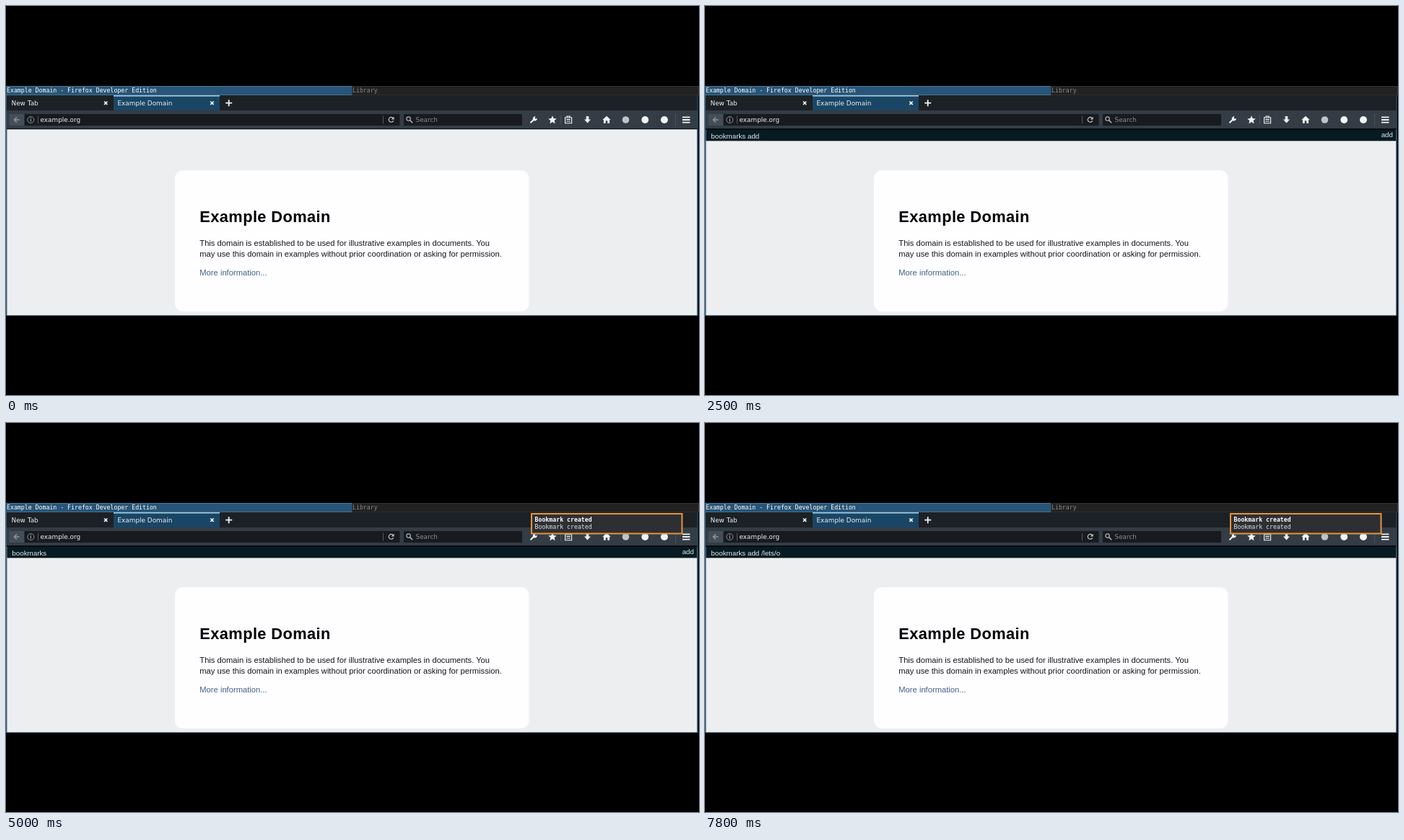
Animation, 960 px wide and 540 px high, one loop 8 s. Source, as an HTML page:

```html
<!DOCTYPE html>
<html lang="en">
<head>
<meta charset="utf-8">
<title>Bookmark command bar</title>
<style>
  html, body { margin: 0; width: 100%; height: 100%; overflow: hidden; background: #000; }
  svg { display: block; width: 960px; height: 540px; }
  text { white-space: pre; }
  .mono { font: 8.22px "DejaVu Sans Mono", monospace; }
  .strong { font-weight: 700; }
  .ui { font: 8.9px "DejaVu Sans", sans-serif; fill: #eef0f2; }
  .ui.dim { fill: #878d92; }
  .bar { font: 9.8px "Liberation Sans", sans-serif; fill: #e4eaec; }
  .page { font: 11.2px "Liberation Sans", sans-serif; fill: #16161a; }
  .page.heading { font-size: 21.8px; font-weight: 700; letter-spacing: .42px; fill: #000; }
  .page.link { fill: #426089; }
  .line { fill: none; stroke: #f2f4f5; }
  .icon { fill: #f2f4f5; }
</style>
</head>
<body>
<svg viewBox="0 0 960 540">
  <rect width="960" height="540"/>

  <!-- window titles -->
  <rect y="111" width="479.5" height="13" fill="#4c7899"/>
  <rect y="112" width="479" height="11.3" fill="#285577"/>
  <rect x="479.5" y="111" width="480.5" height="13" fill="#333"/>
  <rect x="480" y="112" width="479" height="11.3" fill="#222"/>
  <text class="mono" x="1" y="120.3" fill="#fff">Example Domain - Firefox Developer Edition</text>
  <text class="mono" x="480" y="120.3" fill="#888">Library</text>

  <!-- tabs -->
  <rect y="124" width="958.6" height="306" fill="#285577"/>
  <rect x="1" y="124" width="956.5" height="21.5" fill="#1c2125"/>
  <rect x="149" y="124" width="147" height="21.5" fill="#1a4666"/>
  <rect x="149" y="124" width="147" height="1.5" fill="#a5cfe8"/>
  <text class="ui" x="7.5" y="137.8">New Tab</text>
  <text class="ui" x="154.5" y="137.8">Example Domain</text>
  <path class="line" stroke-width="1.6" d="M136 132.5l4.4 4.4m0-4.4l-4.4 4.4M283.3 132.5l4.4 4.4m0-4.4l-4.4 4.4"/>
  <path class="line" stroke-width="1.8" d="M304.2 134.7h9M308.7 130.2v9"/>

  <!-- toolbar -->
  <rect x="1" y="145" width="956.5" height="26" fill="#343c45"/>
  <rect x="1" y="170" width="956.5" height="1.3" fill="#0c1013"/>
  <rect x="4.5" y="150" width="21" height="16" rx="1" fill="#454e58"/>
  <path d="M18.5 158h-7m3.4-3.5l-3.5 3.5l3.5 3.5" fill="none" stroke="#8d959c" stroke-width="1.6"/>
  <rect x="25.5" y="150" width="520" height="16" rx="1" fill="#171b1f"/>
  <circle cx="34.3" cy="158" r="4.5" fill="none" stroke="#a5abb0" stroke-width=".8"/>
  <path d="M34.3 157v3.6M34.3 154.9v1.2" stroke="#b8bdc1"/>
  <path d="M44.5 152.5v11M522.5 152.5v11" stroke="#59616a" stroke-width=".9"/>
  <text class="ui" x="47.5" y="161.2">example.org</text>
  <path d="M536.5 156a3.4 3.4 0 1 0 .2 3.3" fill="none" stroke="#c4c9cd" stroke-width="1.2"/>
  <path d="M537.6 153.7v3.8h-3.8z" fill="#c4c9cd"/>
  <rect x="551" y="150" width="164" height="16" rx="1" fill="#171b1f"/>
  <circle cx="557.6" cy="156.6" r="2.7" fill="none" stroke="#a9afb4" stroke-width="1.2"/>
  <path d="M559.6 158.6l3.6 3.6" stroke="#a9afb4" stroke-width="1.6"/>
  <text class="ui dim" x="567.5" y="161.2">Search</text>

  <path class="line" stroke-width="2" d="M726.5 162.3l5-5"/>
  <path class="icon" d="M730 158a3.3 3.3 0 0 1 3.5-4.6l-1 1.9 1.4 1.4 2-1a3.3 3.3 0 0 1-4.6 3.5z"/>
  <path class="icon" d="M757 152.2l1.7 3.8 4.1.4-3.1 2.7.9 4.1-3.6-2.1-3.6 2.1.9-4.1-3.1-2.7 4.1-.4z"/>
  <path d="M768.5 152v12" stroke="#515a64" stroke-width=".8"/>
  <path class="line" stroke-width="1.1" d="M774.6 154.8h9v8h-9zM777 154.5v-1.5h4.2v1.5M776.3 157.4h5.6M776.3 160h5.6"/>
  <path class="icon" d="M803.7 153h3.6v4.5h2.7l-4.5 5-4.5-5h2.7z"/>
  <path class="icon" d="M832 152.8l5.7 5.3h-1.6v4.7h-2.9v-3.5h-2.4v3.5h-2.9v-4.7h-1.6z"/>
  <circle cx="858.5" cy="158" r="4.8" fill="#bfc4c8"/>
  <circle class="icon" cx="885.3" cy="158" r="4.9"/>
  <circle class="icon" cx="912" cy="158" r="5"/>
  <path d="M927.5 149v18" stroke="#515a64" stroke-width=".8"/>
  <path class="line" stroke-width="1.8" d="M937 154.3h10.5M937 158h10.5M937 161.7h10.5"/>

  <!-- page -->
  <rect x="1.4" y="171.3" width="955.8" height="258" fill="#edeeef"/>
  <rect x="234" y="228" width="490.5" height="196" rx="11" fill="#fefdff"/>
  <text class="page heading" x="268.3" y="300">Example Domain</text>
  <text class="page" x="268.3" y="333.3">This domain is established to be used for illustrative examples in documents. You</text>
  <text class="page" x="268.3" y="348.3">may use this domain in examples without prior coordination or asking for permission.</text>
  <text class="page link" x="268.3" y="374.2">More information...</text>

  <g id="commandBar">
    <rect x="1.4" y="170.5" width="955.8" height="16.5" fill="#071b22"/>
    <rect x="1.4" y="170.5" width="955.8" height="1.5" fill="#03090c"/>
    <rect x="1.4" y="187" width="955.8" height="1" fill="#a3aaad"/>
    <text class="bar" id="command" x="8.3" y="183.6"></text>
    <text class="bar" id="hint" x="953" y="182.2" text-anchor="end"></text>
  </g>

  <g id="notice">
    <rect x="728" y="126" width="208.5" height="27.5" fill="#2e2f33" stroke="#e8933a" stroke-width="2"/>
    <text class="mono strong" x="732.5" y="137.4" fill="#fff">Bookmark created</text>
    <text class="mono" x="732.5" y="147" fill="#e2e2e2">Bookmark created</text>
  </g>
</svg>
<script>
  const LOOP = 8000, BAR_OPENS = 600, NOTICE_OPENS = 3200;

  // [start in ms, typed command, completion hint]
  const steps = [
    [0, "", ""],
    [600, "", "help | bookmarks"],
    [1000, "b", "help | bookmarks"],
    [1200, "b", "bookmarks"],
    [1600, "bookmarks", ""],
    [1700, "bookmarks", "bookmarks"],
    [2100, "bookmarks ", "add"],
    [2400, "bookmarks add", ""],
    [2500, "bookmarks add", "add"],
    [3200, "", ""],
    [3300, "", "help | bookmarks"],
    [3700, "b", "help | bookmarks"],
    [4000, "b", "bookmarks"],
    [4400, "bookmarks", ""],
    [4500, "bookmarks", "bookmarks"],
    [4800, "bookmarks ", "add"],
    [5500, "bookmarks add", ""],
    [5600, "bookmarks add", "add"],
    [6100, "bookmarks add ", ""],
    [6400, "bookmarks add /", ""],
    [6700, "bookmarks add /l", ""],
    [6800, "bookmarks add /le", ""],
    [7000, "bookmarks add /let", ""],
    [7100, "bookmarks add /lets", ""],
    [7400, "bookmarks add /lets/", ""],
    [7800, "bookmarks add /lets/o", ""]
  ];

  const byId = id => document.getElementById(id);
  const show = (id, visible) => byId(id).setAttribute("visibility", visible ? "visible" : "hidden");

  function draw(time) {
    const [, command, hint] = steps.findLast(([start]) => start <= time);
    show("commandBar", time >= BAR_OPENS);
    show("notice", time >= NOTICE_OPENS);
    byId("command").textContent = command;
    byId("hint").textContent = hint;
  }

  const begin = performance.now();
  function tick() {
    draw((performance.now() - begin) % LOOP);
    requestAnimationFrame(tick);
  }
  tick();
</script>
</body>
</html>
```
